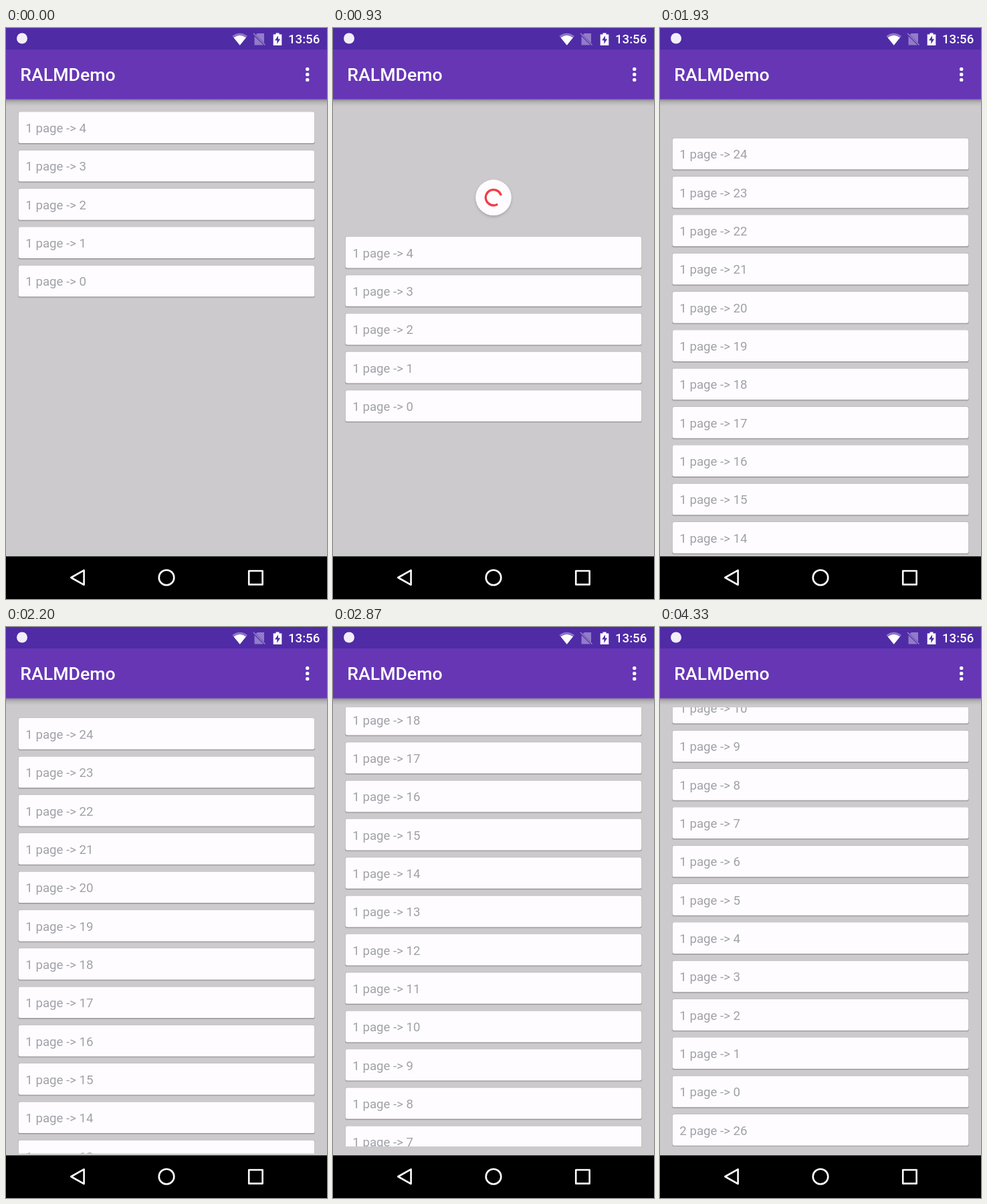
An HTML page that plays this animation: 480 px wide and 853 px high, repeating every 4390 ms.

```html
<!DOCTYPE html>
<html lang="zh">
<head>
<meta charset="utf-8">
<title>RALMDemo</title>
<style>
  html, body { margin: 0; width: 100%; height: 100%; overflow: hidden; background: #cccacc; }
  svg { display: block; width: 100vw; height: 100vh; }
  text { font-family: Roboto, "Noto Sans CJK SC", "Noto Sans CJK", sans-serif; font-size: 18.67px; }
  .medium { font-weight: 500; fill: #fff; }
  .row { fill: #a0a2a9; }
</style>
</head>
<body>
<svg viewBox="0 0 480 853" preserveAspectRatio="none">
  <defs>
    <clipPath id="viewport"><rect x="13.33" y="120" width="453.33" height="656"/></clipPath>
    <linearGradient id="barShadow" x2="0" y2="1">
      <stop offset="0" stop-opacity=".3"/>
      <stop offset=".4" stop-opacity=".11"/>
      <stop offset="1" stop-opacity="0"/>
    </linearGradient>
    <filter id="discShadow" x="-30%" y="-30%" width="160%" height="160%">
      <feDropShadow dx="0" dy="2" stdDeviation="2" flood-opacity=".2"/>
    </filter>
  </defs>
  <rect width="480" height="853" fill="#cccacc"/>

  <g id="list" clip-path="url(#viewport)">
    <g id="shortList"></g>
    <g id="longList">
      <g id="footer">
        <g id="dots" fill="#ff4081"></g>
        <text x="218" y="1586.7" fill="#605e61">加载更多...</text>
      </g>
    </g>
  </g>
  <path id="glow" fill="#673ab7"/>

  <g id="disc">
    <circle r="26.67" fill="#fefcff" filter="url(#discShadow)"/>
    <g id="ring">
      <path id="arc" fill="none" stroke="#f03e48" stroke-width="3.33" stroke-linecap="square"/>
      <path id="arrow" fill="#f03e48" d="M-6.67 0H6.67L0 6.67Z"/>
    </g>
  </g>

  <rect y="106.67" width="480" height="10" fill="url(#barShadow)"/>
  <rect width="480" height="106.67" fill="#6636b5"/>
  <rect width="480" height="32" fill="#4f2ba6"/>
  <circle cx="24" cy="15.5" r="8" fill="#f3effa"/>
  <path d="M338.3 12Q349.7 3.5 361 12L349.7 25.8Z" fill="#fff" opacity=".35"/>
  <path d="M340.6 14.6Q349.7 7.6 358.8 14.6L349.7 25.8Z" fill="#fff"/>
  <g opacity=".38">
    <path d="M376 8H386V22.3L373.6 10Z M371.5 12.3L385 25.5H371.5Z" fill="#fff"/>
    <path d="M370 8L387.5 25.5" stroke="#fff" stroke-width="1.7"/>
  </g>
  <path d="M399.7 9.5H403.5V7.5H408.5V9.5H412.3V26H399.7Z" fill="#fff"/>
  <path d="M407 11.5L402 18.6H405.3V23.7L410.2 16.5H407Z" fill="#4f2ba6"/>
  <text class="medium" x="469.3" y="23.3" text-anchor="end">13:56</text>
  <text class="medium" x="21.33" y="79.4" style="font-size:26.67px">RALMDemo</text>
  <g fill="#fff">
    <circle cx="450.7" cy="61.4" r="2.7"/>
    <circle cx="450.7" cy="69.4" r="2.7"/>
    <circle cx="450.7" cy="77.4" r="2.7"/>
  </g>

  <rect y="789.33" width="480" height="64" fill="#000"/>
  <g fill="none" stroke="#fff" stroke-width="2.6" stroke-linejoin="round">
    <path d="M97.3 821L116.6 810.2V831.8Z"/>
    <circle cx="240" cy="821" r="11.3"/>
    <rect x="363.2" y="811" width="20.4" height="20.4"/>
  </g>
</svg>
<script>
const LOOP = 4390, FIRST_HOLD = 200, STEP = 200 / 3;
const ROW_TOP = 125.33, ROW_PITCH = 57.333, END_SCROLL = 830.67;
const PULL_PEAK = 235, REFRESH_OFFSET = 86.5;
const RING_RADIUS = 11.67, MIN_ARC = 0.045;

const PULL = [380, 800], RELEASE = [890, 1350], FINISH = [890, 1556];
const DATA_READY = 1590, DISC_HIDE = [1590, 1735], RETURN = [1724, 2895];
const SCROLL = [2690, 3260], GLOW_IN = [3240, 3330], GLOW_OUT = [3330, 3850];
const MORE_READY = 4130;

const SVG_NS = "http://www.w3.org/2000/svg";
const $ = id => document.getElementById(id);
const clamp = x => Math.max(0, Math.min(1, x));
const progress = (t, [from, to]) => clamp((t - from) / (to - from));
const lerp = (a, b, u) => a + (b - a) * u;
const smooth = u => u * u * (3 - 2 * u);
const easeOut = (u, power) => 1 - (1 - u) ** power;
const show = (node, visible) => node.setAttribute("visibility", visible ? "inherit" : "hidden");

function add(parent, tag, attrs) {
  const node = document.createElementNS(SVG_NS, tag);
  for (const key in attrs) node.setAttribute(key, attrs[key]);
  return parent.appendChild(node);
}

function addCard(parent, index, label) {
  const card = add(parent, "g", { transform: `translate(18.67 ${ROW_TOP + index * ROW_PITCH})` });
  const box = { width: 442.67, height: 46.67, rx: 2.67 };
  add(card, "rect", { ...box, x: -0.6, y: 0.3, width: 443.87, height: 48.4, opacity: 0.1 });
  add(card, "rect", { ...box, x: -0.3, y: -0.4, width: 443.27, height: 48.2, opacity: 0.16 });
  add(card, "rect", { ...box, fill: "#fefcff" });
  add(card, "text", { class: "row", x: 10.67, y: 30.8 }).textContent = label;
  return card;
}

function fillList(parent, count) {
  for (let i = 0; i < count; i++) addCard(parent, i, `1 page -> ${count - 1 - i}`);
}

const shortList = $("shortList"), longList = $("longList"), footer = $("footer");
fillList(shortList, 5);
fillList(longList, 25);
const nextCard = addCard(longList, 25, "2 page -> 26");

const dots = Array.from({ length: 8 }, (_, i) => {
  const angle = i * Math.PI / 4;
  return add($("dots"), "circle", {
    cx: 190.7 + 13 * Math.cos(angle),
    cy: 749 + END_SCROLL + 13 * Math.sin(angle)
  });
});

function pullOffset(t) {
  if (t < RELEASE[0]) return PULL_PEAK * smooth(progress(t, PULL));
  if (t < RETURN[0]) return lerp(PULL_PEAK, REFRESH_OFFSET, easeOut(progress(t, RELEASE), 4));
  return REFRESH_OFFSET * (1 - progress(t, RETURN)) ** 4;
}

function drawRing(t, offset) {
  const pulled = clamp((clamp(offset / REFRESH_OFFSET) - 0.4) * 5 / 3);
  const spinning = t >= FINISH[0];
  let start = 0, end = 0.8 * pulled, rotation = (0.4 * pulled - 0.25) / 2;
  if (spinning) {
    const u = progress(t, FINISH);
    start = (0.8 - MIN_ARC) * u;
    end = 0.8;
    rotation = lerp(0.075, 1, u);
  }
  const point = turn => {
    const a = turn * 2 * Math.PI;
    return `${RING_RADIUS * Math.cos(a)} ${RING_RADIUS * Math.sin(a)}`;
  };
  const large = end - start > 0.5 ? 1 : 0;
  $("arc").setAttribute("d",
    `M${point(start + rotation)}A${RING_RADIUS} ${RING_RADIUS} 0 ${large} 1 ${point(end + rotation)}`);
  $("arrow").setAttribute("transform",
    `translate(${point(end + rotation)}) rotate(${(end + rotation) * 360}) scale(${pulled})`);
  show($("arrow"), !spinning);
  show($("ring"), end - start > 0.01);
  $("ring").setAttribute("opacity", spinning ? 1 : lerp(0.3, 1, pulled));
}

function drawDots(t) {
  dots.forEach((dot, i) => {
    const delay = i < 7 ? i * 120 : 780;
    const phase = ((t - 2840 - delay) % 1000 + 1000) % 1000 / 1000;
    const eased = (1 - Math.cos(Math.PI * phase)) / 2;
    const dip = 1 - Math.abs(2 * eased - 1);
    dot.setAttribute("r", 3.2 * (1 - 0.6 * dip));
    dot.setAttribute("opacity", 1 - 0.7 * dip);
  });
}

function drawGlow(t) {
  const strength = progress(t, GLOW_IN) * (1 - progress(t, GLOW_OUT));
  const edge = 776 - 10.5 * strength, peak = edge - 14 * strength;
  $("glow").setAttribute("d", `M13.33 ${edge}Q240 ${peak} 466.67 ${edge}V776H13.33Z`);
  $("glow").setAttribute("opacity", 0.13 * strength);
}

function render(t) {
  const offset = pullOffset(t);
  const scroll = END_SCROLL * easeOut(progress(t, SCROLL), 1.5);
  $("list").setAttribute("transform", `translate(0 ${offset})`);
  longList.setAttribute("transform", `translate(0 ${-scroll})`);
  show(shortList, t < DATA_READY);
  show(longList, t >= DATA_READY);
  show(footer, t < MORE_READY);
  show(nextCard, t >= MORE_READY);

  const discScale = 1 - progress(t, DISC_HIDE);
  show($("disc"), offset > 0 && discScale > 0);
  $("disc").setAttribute("transform", `translate(240 ${offset + 66.8}) scale(${discScale})`);
  drawRing(t, offset);
  drawDots(t);
  drawGlow(t);
}

// The picture advances at 15 frames a second after an opening hold.
function stepTime(t) {
  return t < FIRST_HOLD ? 0 : FIRST_HOLD + Math.floor((t - FIRST_HOLD + 5) / STEP) * STEP;
}

const begin = performance.now();
function tick() {
  render(stepTime((performance.now() - begin) % LOOP));
  requestAnimationFrame(tick);
}
tick();
</script>
</body>
</html>
```
